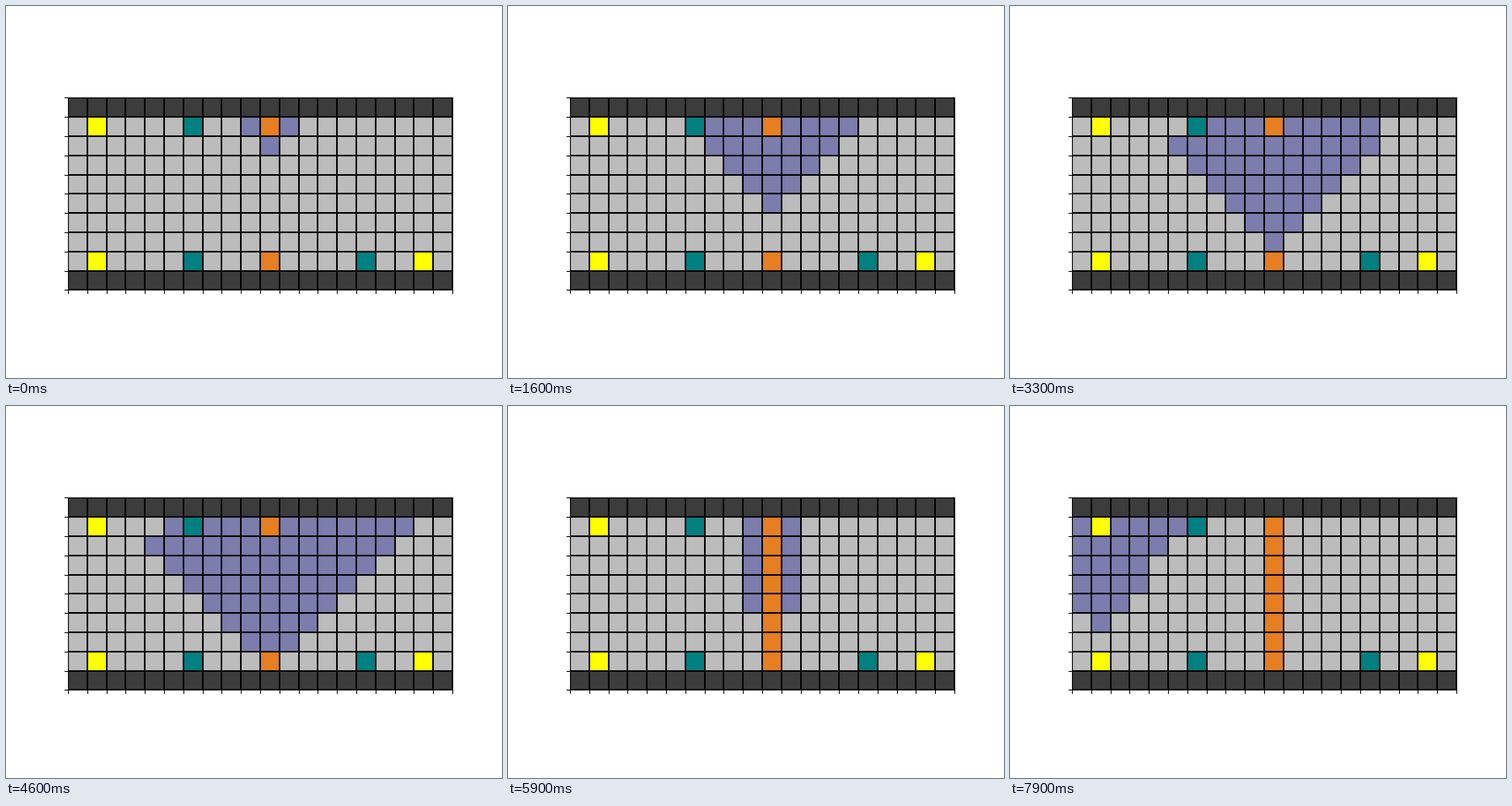
Write a matplotlib script that moves like this. It is 640x480 px and loops after 8 s.

```python
import numpy as np
import matplotlib.pyplot as plt
from matplotlib.animation import FuncAnimation
from matplotlib.colors import ListedColormap

COLS, ROWS, STEPS = 20, 10, 80
FREE, WALL, SEEN, ORANGE, YELLOW, TEAL = range(6)
COLORS = ["#bcbcbc", "#3c3c3c", "#7c7cad", "#e67e22", "#ffff00", "#008080"]
MOVES = [(-1, 0), (0, 1), (0, -1), (1, 0)]  # left, down, up, right

PINS = {
    ORANGE: [(10, 1), (10, 8)],
    YELLOW: [(1, 1), (1, 8), (18, 8)],
    TEAL: [(6, 1), (6, 8), (15, 8)],
}


def make_board():
    board = np.full((ROWS, COLS), FREE)
    board[[0, -1]] = WALL
    for net, pins in PINS.items():
        for x, y in pins:
            board[y, x] = net
    return board


def flood(board, net, sources, target):
    """Breadth-first search, yielding the board after each visited cell.

    Ends with the wave cleared and the path to the target drawn;
    returns the path, source first.
    """
    queue, parent = list(sources), {}
    for cell in queue:
        if cell == target:
            break
        x, y = cell
        for dx, dy in MOVES:
            nxt = x + dx, y + dy
            if not 0 <= nxt[0] < COLS or nxt in parent:
                continue
            if board[nxt[1], nxt[0]] not in (FREE, net):
                continue
            parent[nxt] = cell
            queue.append(nxt)
            if board[nxt[1], nxt[0]] == FREE:
                board[nxt[1], nxt[0]] = SEEN
        yield board.copy()

    board[board == SEEN] = FREE
    path = [target]
    while path[-1] not in sources:
        path.append(parent[path[-1]])
    for x, y in path:
        board[y, x] = net
    yield board.copy()
    return path[::-1]


def route():
    board = make_board()
    start, end = PINS[ORANGE]
    path = yield from flood(board, ORANGE, [start], end)
    yield from flood(board, ORANGE, path, end)
    start, end = PINS[YELLOW][:2]
    yield from flood(board, YELLOW, [start], end)


boards = [b for b, _ in zip(route(), range(STEPS))]

fig, ax = plt.subplots(figsize=(6.4, 4.8), dpi=100)
image = ax.imshow(boards[0], cmap=ListedColormap(COLORS), vmin=-0.5,
                  vmax=len(COLORS) - 0.5, interpolation="nearest")
ax.set_xticks(np.arange(-0.5, COLS), labels=[])
ax.set_yticks(np.arange(-0.5, ROWS), labels=[])
ax.set_xlim(-0.5, COLS - 0.5)
ax.set_ylim(ROWS - 0.5, -0.5)
ax.grid(color="black", linewidth=1.5)


def update(i):
    image.set_data(boards[i])
    return [image]


anim = FuncAnimation(fig, update, frames=STEPS, interval=100, repeat=True)
plt.show()
```
